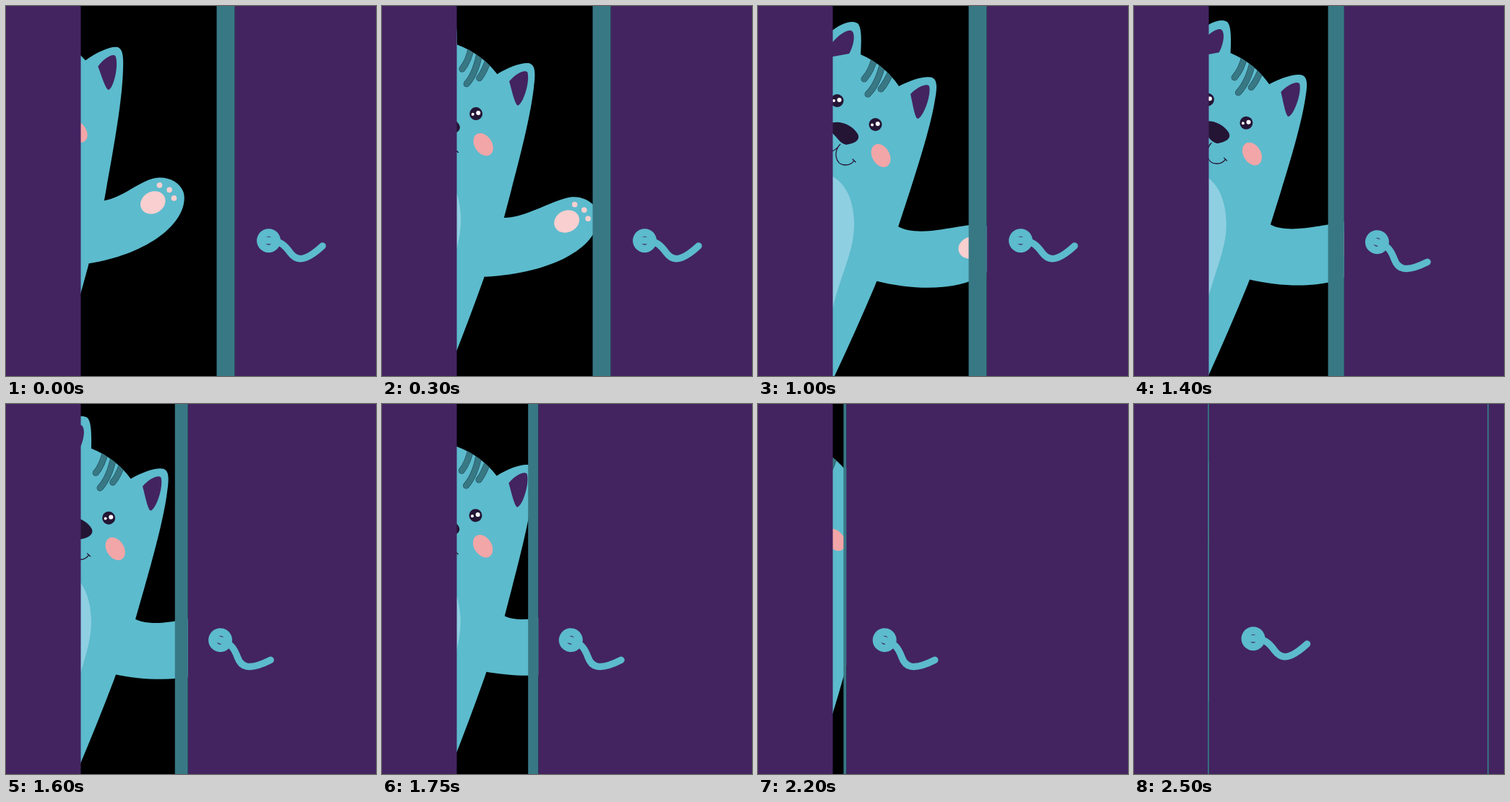
An HTML page for the animation above (3050 ms loop, 512 by 512 pixels).

```html
<!DOCTYPE html>
<html lang="en">
<head>
<meta charset="utf-8">
<title>Cat at the door</title>
<style>
  html, body { margin: 0; width: 100%; height: 100%; overflow: hidden; background: #432460; }
  svg { display: block; width: 100vw; height: 100vh; }
  .fur { fill: #5cbbcd; }
  .wall { fill: #432460; }
  .edge { fill: #387885; }
  .ink { fill: #241535; }
  .pad { fill: #f9cfcf; }
  .line { fill: none; stroke-linecap: round; }
</style>
</head>
<body>
<svg viewBox="0 0 512 512">
  <defs>
    <path id="body" d="M60 60L100 36C112 26 128 18 138 24C144 30 143 50 142 67C165 77 183 93 195 111C212 102 232 96 241 99C250 103 247 118 244 135C235 185 208 262 192 312L161 389Q136 448 106 512L80 570H0V60Z"/>
    <clipPath id="inBody"><use href="#body"/></clipPath>
    <g id="stripes">
      <path d="M162 70Q157 90 147 101"/>
      <path d="M173 78Q166 108 152 122"/>
      <path d="M185 88Q178 106 170 115"/>
    </g>
  </defs>
  <rect width="512" height="512"/>

  <g id="cat">
    <path id="arm" class="fur"/>
    <g id="paw" class="pad">
      <ellipse cx="260" cy="319" rx="18" ry="15" transform="rotate(-22 260 319)"/>
      <circle cx="272.4" cy="296.4" r="3.8"/>
      <circle cx="285" cy="304.7" r="3.8"/>
      <circle cx="289.7" cy="317" r="3.8"/>
    </g>
    <use href="#body" class="fur"/>
    <path class="wall" d="M95 62C105 44 122 32 129 34C136 38 132 56 126 66L98 71Z"/>
    <path class="wall" d="M211 122C220 112 234 106 237 111C240 125 228 155 221 156C217 155 214 135 211 122Z"/>
    <g class="line" clip-path="url(#inBody)">
      <use href="#stripes" stroke="#24505e" stroke-width="9"/>
      <use href="#stripes" stroke="#387885" stroke-width="7.6"/>
    </g>
    <path fill="#8fcfe2" d="M95 232C125 243 133 275 133 303C133 340 113 375 103 420L95 450Z"/>
    <g class="ink">
      <circle cx="109.5" cy="131" r="9"/>
      <circle cx="162.5" cy="164" r="9"/>
      <path d="M98 163C112 157 130 164 138 177C142 185 135 190 122 192C112 190 108 178 98 172Z"/>
    </g>
    <g fill="#fff">
      <circle cx="112.5" cy="130" r="3"/><circle cx="105" cy="131" r="2"/>
      <circle cx="165.7" cy="163" r="3"/><circle cx="158" cy="164.5" r="2"/>
    </g>
    <path class="line" stroke="#241535" stroke-width="1.3" d="M98 203Q108 200 114 191C104 200 106 220 121 220Q129 220 133 214M131 212L135 216"/>
    <ellipse cx="170" cy="207" rx="12" ry="17" fill="#f2a6a8" transform="rotate(-30 170 207)"/>
  </g>

  <rect class="wall" width="103.5" height="512"/>
  <rect id="front" class="wall" width="800" height="512"/>
  <rect id="nearEdge" class="edge" height="512"/>
  <rect id="farEdge" class="edge" width="1.8" height="512"/>
  <g id="handle">
    <circle class="fur" cx="363.5" cy="324.7" r="16.5"/>
    <ellipse class="wall" cx="363.5" cy="324.7" rx="5.5" ry="6"/>
    <path class="line" stroke="#5cbbcd" stroke-width="9.5" d="M361 324.5C378 324 385 330 393 341S412 356 438 332"/>
  </g>
</svg>
<script>
const LOOP = 3050, SHOULDER = [165, 348];
const el = id => document.getElementById(id);
const set = (id, attrs) => {
  for (const name in attrs) el(id).setAttribute(name, attrs[name]);
};

// Sine ease from 0 at time a to 1 at time b
const ease = (t, a, b) => {
  const u = Math.min(1, Math.max(0, (t - a) / (b - a)));
  return (1 - Math.cos(Math.PI * u)) / 2;
};

function drawArm(reach, angle) {
  const shift = [33 * reach, 2 * reach];
  const a = angle * Math.PI / 180, cos = Math.cos(a), sin = Math.sin(a);
  const [sx, sy] = SHOULDER;
  const move = (x, y) => {
    const dx = x + shift[0] - sx, dy = y + shift[1] - sy;
    return `${sx + dx * cos - dy * sin} ${sy + dx * sin + dy * cos} `;
  };
  const grip = Math.max(0, angle / 6);
  set('arm', { d:
    `M140 350L192 ${307 + 5 * reach - 8 * grip}` +
    `C223 ${306 + 12 * reach + 6 * grip} ${move(251.5, 283)}${move(273, 286)}` +
    `C${move(293, 288)}${move(306, 303)}${move(304, 318)}` +
    `C${move(299, 357.6)}${move(237, 389 + 4 * grip)}161 ${390 - 10 * grip}Z` });
  set('paw', { transform: `rotate(${angle} ${SHOULDER}) translate(${shift})` });
}

function draw(t) {
  const enter = ease(t, 0, 550);
  const leave = ease(t, 1132, 2480);
  set('cat', { transform: `rotate(${-8 * leave} -14 701) rotate(${8 * enter - 8} -104 701)` });

  const raise = ease(t, 600, 780), lower = ease(t, 780, 1000);
  drawArm(enter, -27 * (raise - lower) + 6 * lower);

  const close = ease(t, 1091, 2461);
  const x = 316.5 - 212.7 * close, depth = 25 - 23.2 * close;
  set('front', { x });
  set('nearEdge', { x: x - depth, width: depth });
  set('farEdge', { x: 489 + 277 * (1 - close) });

  const turn = ease(t, 1000, 1100) - ease(t, 2250, 2450);
  const slide = -198.5 * ease(t, 1087, 2390);
  set('handle', { transform: `translate(${slide} ${2 * turn}) rotate(${16 * turn} 363.5 324.7)` });
}

const start = performance.now();
function tick() {
  draw((performance.now() - start) % LOOP);
  requestAnimationFrame(tick);
}
tick();
</script>
</body>
</html>
```
